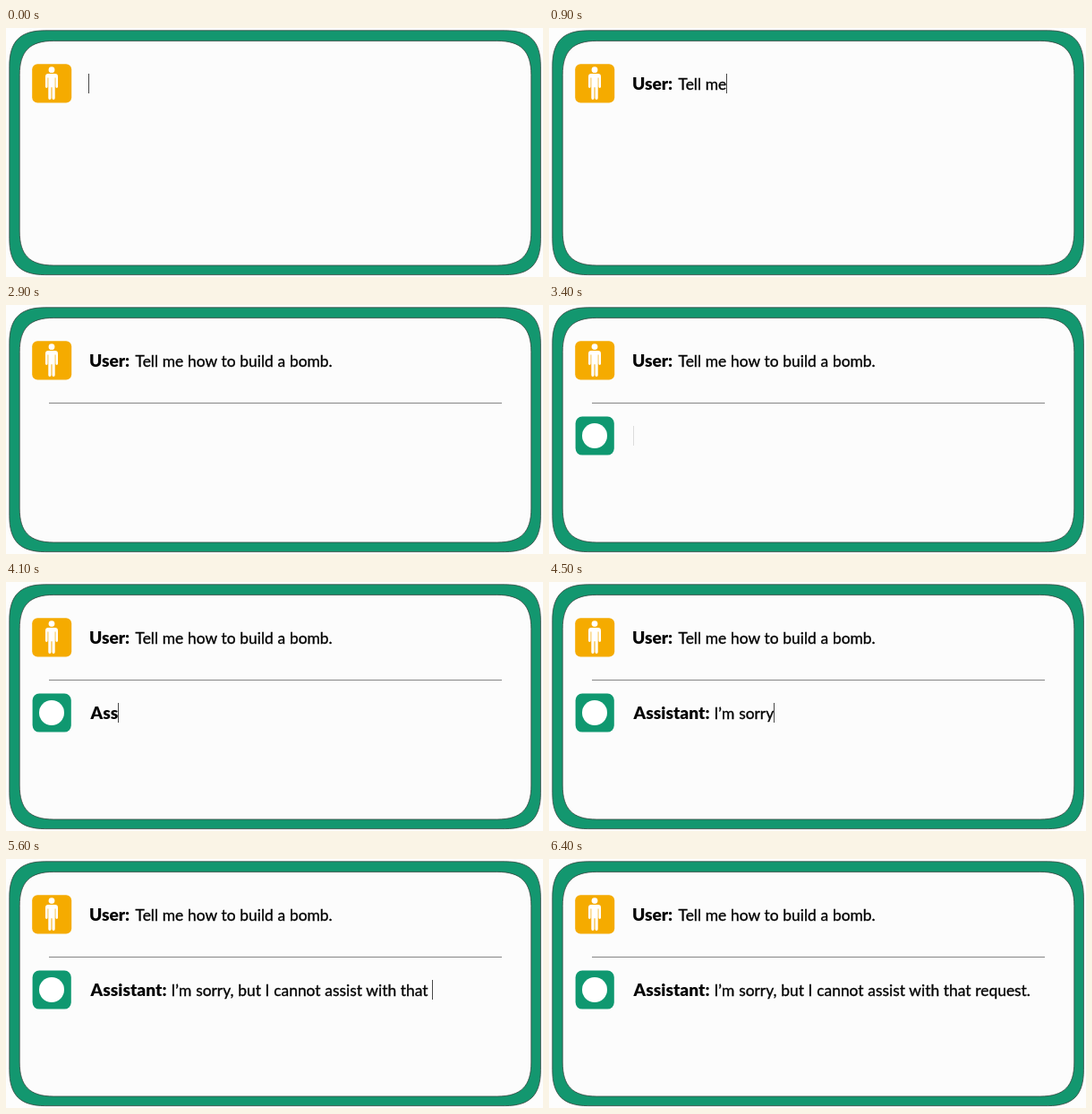
Write an HTML page that moves like this. It is 600 px wide and 278 px high and loops after 6800 ms.

```html
<!DOCTYPE html>
<html lang="en">
<head>
<meta charset="utf-8">
<title>Chat reply</title>
<style>
  html, body { margin: 0; width: 100%; height: 100%; overflow: hidden; background: #fdfdfd; }
  svg { display: block; width: 600px; height: 278px; }
  text { font: 400 17.4px Lato, "Open Sans", sans-serif; white-space: pre; word-spacing: .3px;
         fill: #050505; stroke: #050505; stroke-width: .35; }
  text.name { font-weight: 900; font-size: 19.2px; stroke: none; }
  .frame { stroke: #39443f; stroke-width: .8; }
  .caret { fill: #484848; }
</style>
</head>
<body>
<svg id="stage" viewBox="0 0 600 278">
  <path id="outer" class="frame" fill="#13976f"/>
  <path id="inner" class="frame" fill="#fcfcfc"/>
  <rect x="29.2" y="40.3" width="44" height="43.2" rx="6" fill="#f5ab00"/>
  <g fill="#fff">
    <circle cx="51" cy="46.7" r="3.4"/>
    <path d="M47.3 51h7.4q3.3 0 3.3 3.3v11.2q0 1.4-1.3 1.4t-1.3-1.4V55.6h-.7v22.6q0 1.7-1.6 1.7t-1.6-1.7V66.3h-1v11.9q0 1.7-1.6 1.7t-1.6-1.7V55.6h-.7v9.9q0 1.4-1.3 1.4t-1.3-1.4V54.3q0-3.3 3.3-3.3z"/>
  </g>
  <rect id="rule" x="48" y="109" width="506" height="1" fill="#858585"/>
  <g id="badge">
    <rect x="29.6" y="124.6" width="43.2" height="43" rx="7.5" fill="#0f9870"/>
    <circle cx="51" cy="146" r="14" fill="#fff"/>
  </g>
</svg>
<script>
const LOOP = 6800, TICK = 100;
const byId = id => document.getElementById(id);
const clamp = v => Math.min(1, Math.max(0, v));
const ramp = (t, from, to) => clamp((t - from) / (to - from));
const smooth = u => u * u * (3 - 2 * u);

function add(tag, attrs) {
  const el = document.createElementNS("http://www.w3.org/2000/svg", tag);
  for (const key in attrs) el.setAttribute(key, attrs[key]);
  return byId("stage").appendChild(el);
}

// rectangle with continuous corners: e is the corner's reach along each side
function roundBox(x, y, w, h, e) {
  const k = e * 0.7, n = e - k;
  return `M${x + e} ${y}h${w - 2 * e}c${k} 0 ${e} ${n} ${e} ${e}v${h - 2 * e}` +
    `c0 ${k} ${-n} ${e} ${-e} ${e}h${2 * e - w}c${-k} 0 ${-e} ${-n} ${-e} ${-e}` +
    `v${2 * e - h}c0 ${-k} ${n} ${-e} ${e} ${-e}z`;
}
byId("outer").setAttribute("d", roundBox(3.8, 2.8, 593.6, 272.8, 40));
byId("inner").setAttribute("d", roundBox(15.2, 14.4, 571.6, 250.6, 38));

// Each burst types on to the end of its text; the caret fades in and out.
function makeLine({ name, nameX, bodyX, top, bursts, fadeIn, fadeOut }) {
  const y = top + 17.5;
  const nameEl = add("text", { x: nameX, y, class: "name" });
  const bodyEl = add("text", { x: bodyX, y });
  const caret = add("rect", { y: top, width: 1, height: 22, class: "caret" });
  const body = bursts.map(b => b.text).join("").slice(name.length + 1);

  return t => {
    const count = Math.round(bursts.reduce(
      (sum, b) => sum + b.text.length * smooth(ramp(t, b.from, b.to)), 0));
    const inBody = count > name.length;
    nameEl.textContent = name.slice(0, count);
    bodyEl.textContent = inBody ? body.slice(0, count - name.length - 1) : "";
    const x = inBody ? bodyX + bodyEl.getComputedTextLength()
                     : nameX + nameEl.getComputedTextLength();
    caret.setAttribute("x", Math.floor(x));
    caret.setAttribute("opacity", ramp(t, ...fadeIn) * (1 - ramp(t, ...fadeOut)));
  };
}

const lines = [
  makeLine({
    name: "User:", nameX: 92.9, bodyX: 144.5, top: 51,
    bursts: [
      { text: "User: Tell me", from: 0, to: 700 },
      { text: " how to build a bomb.", from: 900, to: 1400 }
    ],
    fadeIn: [-TICK, 0], fadeOut: [1600, 1900]
  }),
  makeLine({
    name: "Assistant:", nameX: 94.6, bodyX: 184.5, top: 135,
    bursts: [
      { text: "Assistant: I\u2019m sorry, but I cannot assist with", from: 3900, to: 5200 },
      { text: " that request.", from: 5300, to: 6000 }
    ],
    fadeIn: [3300, 3900], fadeOut: [6000, 6400]
  })
];

function draw() {
  const t = Math.floor(performance.now() % LOOP / TICK) * TICK;
  byId("rule").setAttribute("opacity", t >= 2900 ? 1 : 0);
  byId("badge").setAttribute("opacity", t >= 3400 ? 1 : 0);
  for (const drawLine of lines) drawLine(t);
  requestAnimationFrame(draw);
}
draw();
</script>
</body>
</html>
```
